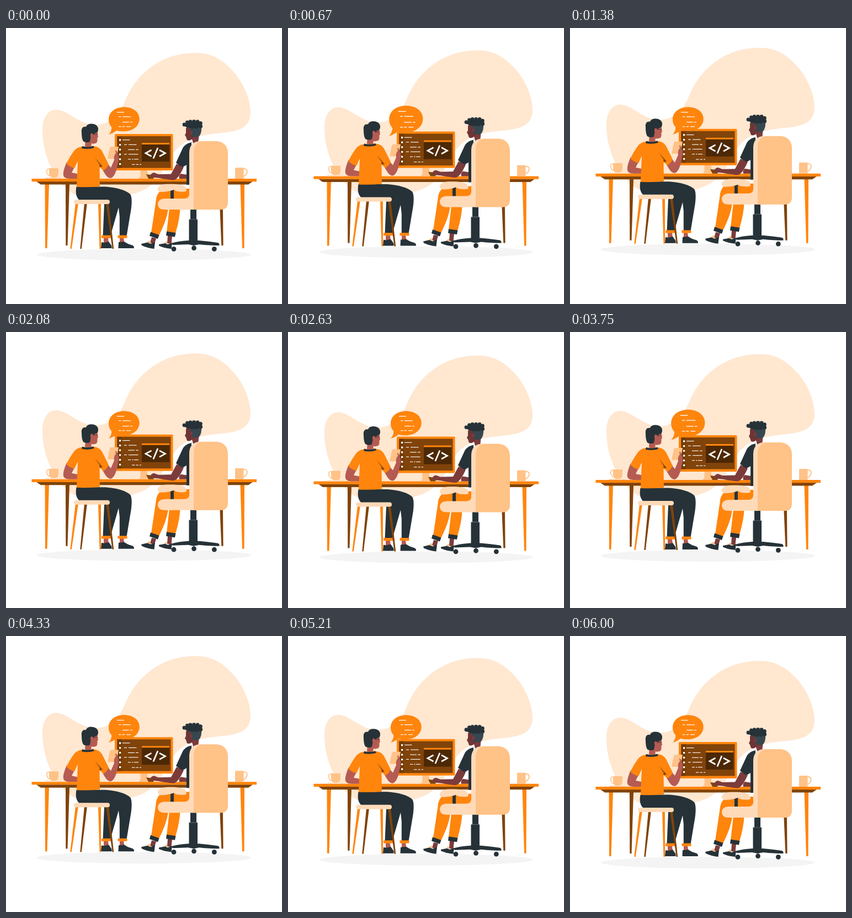
Recreate the animation shown at these times as an HTML page with a canvas. Size 500 by 500 pixels, loop 6.04 s.

```html
<!DOCTYPE html>
<html lang="en">
<head>
<meta charset="utf-8">
<title>Two developers at a desk</title>
<style>
html, body { margin: 0; width: 100%; height: 100%; overflow: hidden; background: #fff; }
canvas { display: block; width: 500px; height: 500px; }
</style>
</head>
<body>
<canvas id="stage" width="500" height="500"></canvas>
<script>
const ctx = document.getElementById('stage').getContext('2d');
const LOOP = 6040, CYCLE = 3000, LIFT = 10;
const C = {
  orange: '#ff850d', brown: '#80430a', deep: '#4d2806', side: '#723c08',
  blob: '#ffe7d0', tan: '#ffc287', pale: '#ffdab8', dark: '#263238', grey: '#37474f',
  skin: '#b55b52', skinDark: '#7c3b3b', face: '#6e3536', shadow: '#f4f4f4', white: '#fff'
};

function shape(color, d) {
  ctx.fillStyle = color;
  ctx.fill(new Path2D(d));
}

function line(color, width, d) {
  ctx.strokeStyle = color;
  ctx.lineWidth = width;
  ctx.stroke(new Path2D(d));
}

function box(color, x, y, w, h, r = 0) {
  ctx.fillStyle = color;
  ctx.beginPath();
  ctx.roundRect(x, y, w, h, r);
  ctx.fill();
}

function oval(color, x, y, rx, ry = rx) {
  ctx.fillStyle = color;
  ctx.beginPath();
  ctx.ellipse(x, y, rx, ry, 0, 0, Math.PI * 2);
  ctx.fill();
}

// Tapered leg: top edge x1..x2 at y, bottom edge x3..x4 at y2.
function leg(color, x1, x2, y, x3, x4, y2) {
  shape(color, `M${x1} ${y}H${x2}L${x4} ${y2}H${x3}Z`);
}

// Each row: y followed by [start, end] pairs.
function dashes(rows, width) {
  for (const [y, ...parts] of rows)
    for (const [a, b] of parts) line(C.white, width, `M${a} ${y}H${b}`);
}

function backdrop() {
  oval(C.shadow, 250, 410.5, 194, 10.5);
  shape(C.blob, `M66 185C66 162 76 148 91 148C112 148 132 175.5 162 175.5
    C186 175 202 162 214.5 135C235 82 282 45 343 45C374 45 393 58 412 79
    C432 101 443 132 443 153C443 181 421 187 392 190C347 194 316 202 297 236
    C280 270 262 296 223 302C184 312 150 311 126 302.5C97 289 66 241 66 185Z`);
}

function table() {
  leg(C.brown, 108, 115, 283, 108.3, 111.5, 394);
  leg(C.brown, 385.5, 392.5, 283, 390.3, 393.6, 394);
  leg(C.orange, 70.5, 78, 283, 71, 74.5, 399);
  leg(C.orange, 424.5, 432, 283, 428, 431.5, 399);
  shape(C.brown, 'M55 278H447L439 283.5H63Z');
  box(C.orange, 46.5, 273, 407.5, 5.2);
}

function cups() {
  line(C.tan, 1.6, 'M80 255.5C73 254 73 259 74.5 263C76 267 79 268 82 267');
  shape(C.tan, 'M78 254H95V262C95 267 93 271 89 271H84C80 271 78 267 78 262Z');
  box(C.pale, 71, 271, 30, 2, 1);
  line(C.tan, 1.8, 'M430 255.5C438 254 438 261 435 265C433 268 431 269 429 268.5');
  box(C.tan, 415, 253, 15.5, 20, 1);
}

function monitor() {
  shape(C.tan, 'M243.5 257H256V268L257 273H240L243.5 269Z');
  box(C.orange, 197, 192, 105.5, 66, 2);
  box(C.brown, 201.3, 196, 97.2, 57.5);
  box(C.side, 201.3, 196, 8.2, 57.5);
  for (let i = 0; i < 6; i++) box(C.white, 205, 201.3 + i * 8.7, 3.2, 3.2);
  dashes([
    [202.7, [211, 224.5]],
    [211.3, [214, 219], [222, 236.5]],
    [220.3, [221, 233], [235, 240]],
    [228.7, [214, 219], [222, 239.5]],
    [237.7, [221, 226], [228, 230.5], [232, 240]],
    [247.2, [228, 233.5], [235.5, 240], [242, 245]]
  ], 1.1);
  box(C.deep, 246, 210, 50, 32);
  box(C.orange, 246, 208, 50, 3);
  ctx.lineJoin = 'miter';
  line(C.white, 2.7, 'M263.5 221L253 226.7L263.5 232.5M275 217L266.8 236.5M278 221L288.5 226.7L278 232.5');
  shape(C.brown, 'M254 265L263 266L268 273H258Z');
}

function shoe(d, ankle) {
  shape(C.skin, ankle);
  shape(C.dark, d);
}

function leftPerson() {
  shape(C.tan, 'M191 215H204L200 237H186Q183.5 237 184.5 234L188 218Q188.6 215 191 215Z');
  // arms
  shape(C.skin, `M110 243C106 252 103 261 104 267C105 272 111 273 118 273H130
    L129 264L119 262L125 250Z`);
  shape(C.skin, `M174 255L184 246L190 253L196 239C195 232 197 229 199 227L198 222
    C200 221 201 224 202 227L204 232C205 239 203 244 202 248C200 260 196 270 190 272
    C183 273 178 262 174 255Z`);
  // legs
  shoe('M173 388L178 389L186 387L191 394Q192 396 191.5 399H172Z', 'M177 380H185L186 390H177Z');
  shoe('M204 388L214 387L221 391L230 394Q232.5 396 232 399H203.5Z', 'M206 380H213L214.5 389Q210 391 206 389Z');
  shape(C.dark, `M127.5 287.5H180C201 289 218 294 225 301C229 306 228 324 225 338
    L218.5 377H205.8V341L204 325L189 377H175.5L178 318L133 312C126 306 126 296 127.5 287.5Z`);
  box(C.orange, 173, 375.5, 17, 5.2, 1);
  box(C.orange, 202.5, 375.5, 17, 5.2, 1);
  // torso
  shape(C.orange, `M138 215C130 216 126 219 123 223C117 231 112 240 109.5 246
    Q116 252 124 254L130 241L128 288Q150 289 170 287L169.5 252L176.5 258
    Q183 254 186 247L174 223C170 217 166 215 159 214Z`);
  shape(C.brown, 'M161 235L175 251L169.5 252V247Z');
  // head
  shape(C.skin, 'M144 202L155 204L154.5 214Q149 217 143 214Z');
  shape(C.dark, 'M138 214Q149 217 158 213.5L160 217Q149 220.5 137 218Z');
  shape(C.skin, 'M150 190L160 185L166 187L166 192L167 197L165.5 199L165.5 204Q165 209 161 209Q156 211 151 207Z');
  shape(C.dark, `M145 179C140 178 136 181 137 189C137 196 138 204 141 206Q147 208.5 152 206
    L153.5 198Q152 194 154 191Q157 190 158 193L161 191L166 188
    C169 182 166 174 156 173.5C149 173 146 176 145 179Z`);
  oval(C.skin, 155.3, 194.8, 2.2, 3);
  line(C.dark, 0.8, 'M158 193L166 192.5');
}

function stool() {
  leg(C.brown, 142, 147, 317, 134.3, 136.8, 400);
  leg(C.brown, 181, 186, 317, 192.6, 195.2, 400);
  leg(C.orange, 126, 131, 317, 116.3, 118.8, 400);
  leg(C.orange, 167, 172, 317, 169.5, 172, 400);
  box(C.pale, 123, 311, 65, 8, 4);
}

function rightPerson() {
  // arms
  shape(C.skinDark, 'M314 273Q312 267 317 264L329 266V273Z');
  shape(C.skinDark, `M309 246L322 252C317 263 311 274 304 275.5C293 275 280 272 270 271
    Q263 272 261.5 268Q262 263 268 262L276 265L299 264.5Z`);
  shape(C.dark, 'M338 207C329 208 323 212 320 218L308 244Q313 249 320 252L327 248V284H336V207Z');
  // legs
  shape(C.skinDark, 'M264 379L272 381L269 391L261 389Z');
  shape(C.skinDark, 'M293 376L301 377L299.5 391L292 390Z');
  shape(C.tan, 'M256 387L260 385L263 391L257 390Z');
  shape(C.tan, 'M287 389L291 386L293 391L288 391Z');
  shape(C.dark, 'M245 391L256 388.5L262 391L270 387.5L268.5 400Q257 399 246 394Z');
  shape(C.dark, 'M277 392L288 390L293 392L301 389L299.5 400Q287 399 277 394.5Z');
  shape(C.orange, 'M296 326H315.5Q315 345 307 372L291 370Z');
  shape(C.orange, `M332 291H290C278 293 272 302 271.5 314L263 371L277 376
    C286 358 292 343 294 326L332 318Z`);
  shape(C.dark, 'M262 369.5L277.5 375L275 382L260 376.5Z');
  shape(C.dark, 'M291 368.5L307.5 371L306 378.5L290 376Z');
  // head
  shape(C.skinDark, 'M335 195L350 190L348 210Q343 215 339 208Z');
  shape(C.face, 'M326 181L338 180L342 196L336 202Q332 205 328 203L326 197L324 194L326 190Z');
  shape(C.grey, 'M333 180L354 178Q355 190 350 196Q343 200 336 195L335 188Z');
  oval(C.skinDark, 335.6, 190, 2.3, 3.2);
  shape(C.dark, 'M324 175L331 170L352 170L355 179L337 182L325 179Z');
  const curls = [[323, 175, 3.4], [328.5, 171, 3.4], [334, 169.5, 3.2], [340.5, 169.5, 3.4],
    [347, 169.7, 3.4], [352.3, 172.5, 3.5], [352.5, 178, 3.6], [345, 179, 3.6], [338, 179, 3.4], [330, 178, 3.4]];
  for (const c of curls) oval(C.dark, ...c);
}

function chair() {
  // stand and wheels
  box(C.dark, 334, 327, 11, 20);
  box(C.dark, 331.5, 347, 15.5, 39);
  line('#65727a', 0.7, 'M331.5 346.7H347M339.5 386V392');
  shape(C.dark, `M299 390Q312 386 330 385H350Q371 387 384 389Q387 390 386.5 394
    Q370 394 350 392L340 394L330 392L302 393Z`);
  for (const [x, y] of [[304, 400.3], [340.5, 398.7], [377.3, 400.3]]) oval(C.dark, x, y, 4.4);
  // arm rest
  box(C.dark, 298, 292, 6, 18);
  shape(C.pale, `M287 283C305 282 320 283 325 288Q328 292 326 296Q310 298 304 293
    Q294 297 280 297Q274 296 275 290Q278 284 287 283Z`);
  // seat and back
  shape(C.pale, `M356 205H350C338 206 332 214 332 226V302Q331 309 323 309H287
    Q275 310 275 320Q276 329 287 329H350Z`);
  shape(C.tan, `M355 205H382C394 206 402 214 402 227V317Q401 329 390 329H340V225
    C340 214 345 207 355 205Z`);
}

function bubble(scale) {
  ctx.save();
  ctx.translate(214, 168);
  ctx.scale(scale, scale);
  ctx.translate(-214, -168);
  shape(C.orange, `M214 143.2C230 143.2 241.7 152 241.7 164.5C241.7 178 229 187.3 213 187.3
    Q206 187.3 200 185.7Q194 191 186 193Q191 188 191.5 180Q186 174 186 166
    C186 152 198 143.2 214 143.2Z`);
  dashes([
    [152.6, [201, 214]],
    [160.8, [204, 208.5], [211, 226]],
    [170.5, [211, 223], [225, 229]],
    [178.6, [204, 208.5], [210.5, 215], [218, 226]]
  ], 1.2);
  ctx.restore();
}

// The standard CSS "ease" curve, solved by bisection.
function ease(x) {
  const bez = (a, b, u) => 3 * a * u * (1 - u) ** 2 + 3 * b * u * u * (1 - u) + u ** 3;
  let lo = 0, hi = 1;
  for (let i = 0; i < 24; i++) {
    const mid = (lo + hi) / 2;
    if (bez(0.25, 0.25, mid) < x) lo = mid; else hi = mid;
  }
  return bez(0.1, 1, lo);
}

function pulse(p) {
  if (p >= 0.5) return 1;
  return p < 0.25 ? 1 + 0.1 * ease(p * 4) : 1.1 - 0.1 * ease(p * 4 - 1);
}

function draw(ms) {
  const p = (ms % LOOP) % CYCLE / CYCLE;
  const lift = LIFT * (1 - Math.abs(1 - 2 * p));
  const floating = (...parts) => {
    ctx.save();
    ctx.translate(0, -lift);
    parts.forEach(part => part());
    ctx.restore();
  };
  ctx.fillStyle = C.white;
  ctx.fillRect(0, 0, 500, 500);
  floating(backdrop);
  bubble(pulse(p));
  floating(table, cups, monitor, leftPerson, stool, rightPerson, chair);
}

const start = performance.now();
function tick() {
  draw(performance.now() - start);
  requestAnimationFrame(tick);
}
tick();
</script>
</body>
</html>
```
